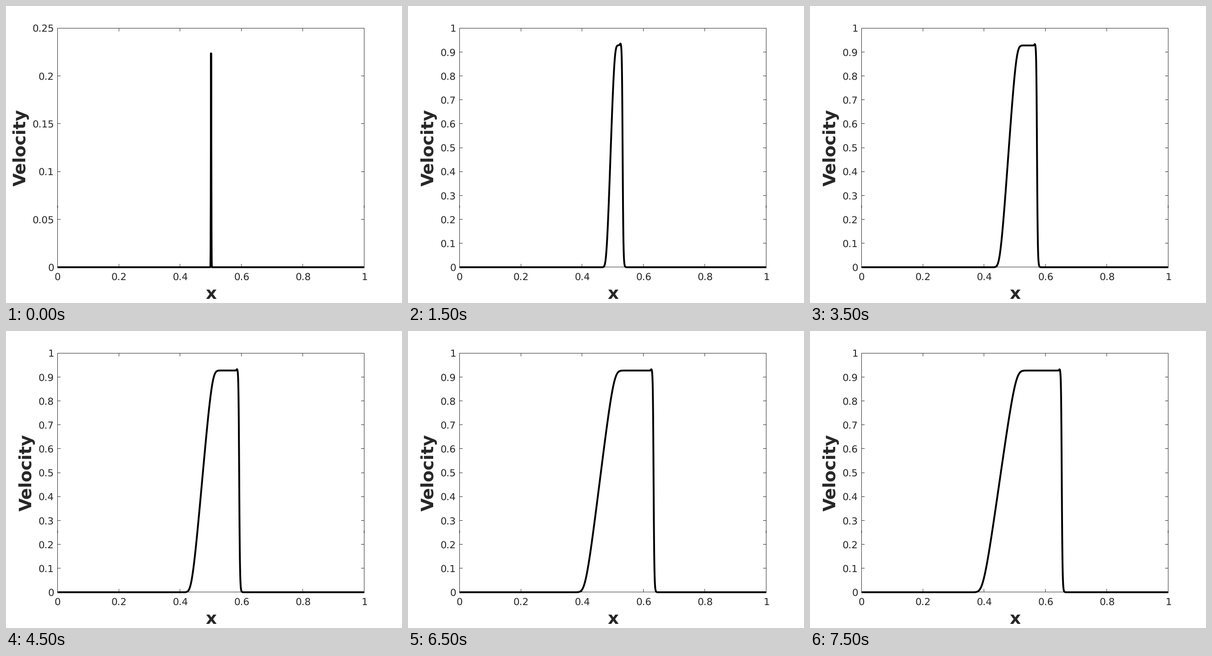
Animation of 864 by 648 pixels, one loop 8000 ms. Source, as a matplotlib script:

```python
import math

import matplotlib.pyplot as plt
import numpy as np
from matplotlib.animation import FuncAnimation

W, H, DPI = 864, 648, 96
FRAMES, INTERVAL = 16, 500
LEFT, RIGHT, TOP, BOTTOM = 112.3, 781.9, 48.5, 570.0
INK = "#262626"

plt.rcParams["font.family"] = "DejaVu Sans"
plt.rcParams["text.hinting"] = "none"
plt.rcParams["path.simplify"] = False

fig = plt.figure(figsize=(W / DPI, H / DPI), dpi=DPI, facecolor="white")
ax = fig.add_axes([0, 0, 1, 1])
ax.set_xlim(0, W)
ax.set_ylim(H, 0)
ax.axis("off")


def px(x):
    return LEFT + (RIGHT - LEFT) * x


def py(u, top):
    return BOTTOM - (BOTTOM - TOP) * u / top


def crisp(v):
    return math.floor(v) + 0.5


def rule(x0, y0, x1, y1, width=0.75):
    return ax.plot([x0, x1], [y0, y1], color=INK, lw=width, snap=False,
                   solid_capstyle="butt")[0]


def label(x, y, text, ha="center", size=16, **kw):
    return ax.text(x, y, text, ha=ha, va="baseline", fontsize=size,
                   color=INK, **kw)


# Frame of the plot
x0, x1, y0, y1 = crisp(LEFT), crisp(RIGHT - 0.5), crisp(TOP), 569.5
TICK = 6.7
for y in (y0, y1):
    rule(x0 - 0.5, y, x1 + 0.5, y)
for x in (x0, x1):
    rule(x, y0, x, y1)
    rule(x, 435.5, x, 440.5, 1.2)
for i in range(6):
    x = crisp(px(i / 5) - 0.2)
    rule(x, y1, x, y1 - TICK)
    rule(x, y0, x, y0 + TICK)
    label(px(i / 5) + 0.3, 598, f"{i / 5:g}")
label(447.3, 639, "x", size=28, weight="bold")


def y_scale(top, step, title_x):
    """Ticks, numbers and title that belong to one vertical range."""
    parts = []
    for i in range(round(top / step) + 1):
        v = i * step
        y = py(v, top)
        yc = crisp(y - 0.1) if i < round(top / step) else y0
        parts += [rule(x0, yc, x0 + TICK, yc), rule(x1, yc, x1 - TICK, yc),
                  label(105, y + 7.7, f"{v:.3g}", ha="right")]
    parts.append(label(title_x, 309, "Velocity", size=28, weight="bold",
                       rotation=90, rotation_mode="anchor"))
    return parts


start_scale = y_scale(0.25, 0.05, 43.3)
main_scale = y_scale(1, 0.1, 56.3)

xs = np.linspace(0, 1, 2001)
erfc = np.vectorize(math.erfc)


def scaled_erfc(p):
    p = np.clip(p, -25, 25)
    return np.exp(p * p) * erfc(p)


def velocity(k):
    if k == 0:
        return 0.226 * np.exp(-((xs - 0.5006) / 0.001) ** 2)
    t = 0.00576 * (k + 0.05)
    age = t / 0.087
    plateau = 0.9275 + 0.004 * math.exp(-k / 3)

    # Viscous rarefaction fan (Cole-Hopf solution)
    width = 1.113 * t
    spread = 0.0151 * math.sqrt(age)
    mid = 0.5 - 0.626 * t + 0.0042 * age ** 0.2
    low = scaled_erfc((mid + width / 2 - xs) / spread)
    high = scaled_erfc((xs - mid + width / 2) / spread)
    fan = low / (low + high)

    # Shock front with a small overshoot behind it
    front = 0.5013 + 0.01008 * k
    z = np.clip((xs - front) / 0.00105 + 0.35, -60, 60)
    shock = (1 + np.exp(z)) ** -0.7
    height = 0.0062 + 0.0045 * math.exp(-k / 4)
    bump = height * np.exp(-((xs - front + 0.0066) / 0.0026) ** 2)
    return (plateau * fan + bump) * shock


curve, = ax.plot([], [], color="black", lw=3, solid_capstyle="butt",
                 solid_joinstyle="round", zorder=5)


def update(k):
    first = k == 0
    for part in start_scale:
        part.set_visible(first)
    for part in main_scale:
        part.set_visible(not first)
    curve.set_data(px(xs), py(velocity(k), 0.25 if first else 1))
    return [curve, *start_scale, *main_scale]


anim = FuncAnimation(fig, update, frames=FRAMES, interval=INTERVAL,
                     init_func=lambda: update(0), repeat=True, repeat_delay=0)
plt.show()
```
